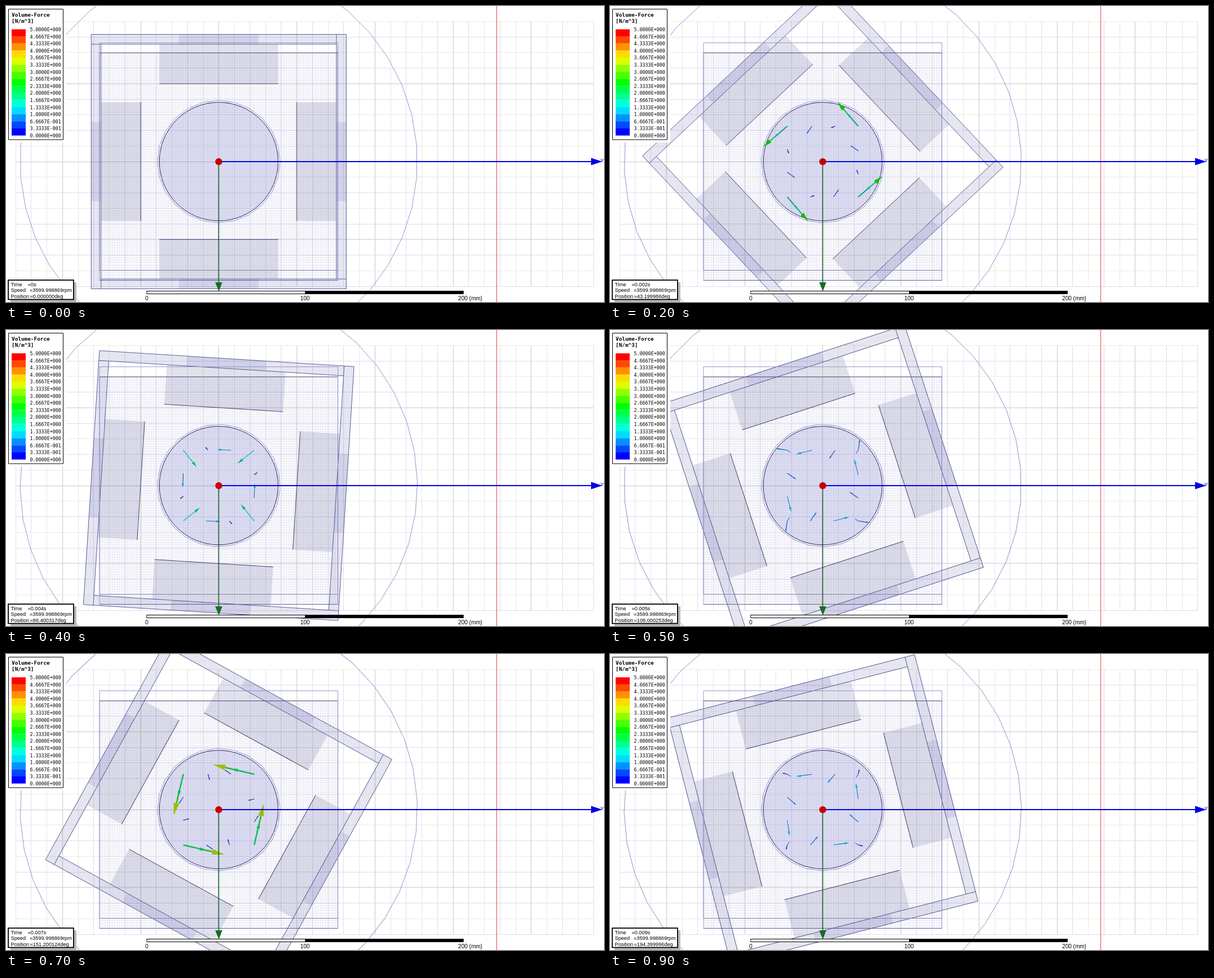
An HTML page that plays this animation: 1062x527 px, repeating every 1000 ms.

```html
<!DOCTYPE html>
<html lang="en">
<head>
<meta charset="utf-8">
<title>Volume force on a rotating field</title>
<style>
  html, body { margin: 0; width: 100%; height: 100%; overflow: hidden; background: #fff; }
  svg { display: block; width: 1062px; height: 527px; }
  text { white-space: pre; fill: #000; }
  .mono { font: 8.35px "DejaVu Sans Mono", monospace; }
  .title { font: bold 9.4px "DejaVu Sans Mono", monospace; }
  .sans { font: 9.2px "Liberation Sans", Arial, sans-serif; }
  .scale { font: 10px "Liberation Sans", Arial, sans-serif; }
  .edge { fill: none; stroke: #50508f; stroke-width: .9; }
  .pale { fill: none; stroke: #8c8cca; stroke-width: .9; }
  .dark { fill: none; stroke: #34346a; stroke-width: .9; }
</style>
</head>
<body>
<svg viewBox="0 0 1062 527">
  <defs>
    <pattern id="dots" width="3" height="3" patternUnits="userSpaceOnUse">
      <rect width="1" height="1" fill="#5a5aaf" fill-opacity=".58"/>
    </pattern>
    <pattern id="hatch" width="2" height="2" patternUnits="userSpaceOnUse">
      <path d="M0 0h1v1h-1zM1 1h1v1h-1z" fill="#28288c" fill-opacity=".23"/>
    </pattern>
  </defs>

  <g id="grid"></g>
  <rect x="166" y="83" width="423" height="406" fill="url(#dots)"/>
  <g id="rotor"></g>
  <path class="pale" d="M166 65.5H589.5V470.5H166z"/>
  <path class="edge" d="M166 83.5H589.5M166 488.5H589.5"/>
  <path class="pale" d="M166 83V489M589.5 83V489"/>
  <circle cx="377.8" cy="277" r="105.5" fill="#5a5abe" fill-opacity=".18" stroke="#202060"/>
  <g id="forces" transform="translate(377.8 277)"></g>

  <path d="M871.5 0V527" stroke="#d84848"/>
  <path d="M378 277H1040" stroke="#0000e6" stroke-width="2"/>
  <path d="M1039 270.5L1059 277L1039 283.5z" fill="#0000e6"/>
  <text class="sans" x="1055.5" y="277.5" style="fill:#0000e6">Y</text>
  <path d="M377.7 277V493" stroke="#1e6432" stroke-width="1.6"/>
  <path d="M371.5 492h12.5L378 508z" fill="#146e1e"/>
  <circle cx="377.8" cy="277.2" r="6.2" fill="#c80000"/>

  <path d="M0 0H107V243H0z" fill="#fff"/>
  <path d="M4.5 5.5H101.5V238H4.5z" fill="#fff" stroke="#000"/>
  <text class="title" x="10" y="19">Volume-Force</text>
  <text class="title" x="10" y="30">[N/m^3]</text>
  <g id="legend"></g>

  <rect x="8" y="492" width="117" height="35" fill="#b9b9b4"/>
  <rect x="4" y="488" width="116" height="34.5" fill="#fff" stroke="#000" stroke-width="1.8"/>
  <g class="sans">
    <text x="8.5" y="498.5">Time</text><text id="time" x="38.5" y="498.5"></text>
    <text x="8.5" y="509">Speed</text><text x="42" y="509">=3599.998869rpm</text>
    <text x="8.5" y="519.5">Position</text><text id="angle" x="42.5" y="519.5"></text>
  </g>

  <rect x="250" y="507.5" width="562" height="5" fill="#fff" stroke="#000"/>
  <rect x="531" y="507" width="281.5" height="6" fill="#000"/>
  <g class="scale" text-anchor="middle">
    <text x="250" y="524">0</text><text x="531" y="524">100</text><text x="824.5" y="524">200 (mm)</text>
  </g>
</svg>
<script>
const CX = 377.8, CY = 277, STEP_MS = 100, STEP_DEG = 21.6;
const get = id => document.getElementById(id);
const rows = (n, draw) => Array.from({ length: n }, (_, i) => draw(i)).join('');

// Grid
const CELL = 27.75;
function gridLine(i, vertical) {
  const at = Math.floor((vertical ? CX : CY) + i * CELL) + .5;
  const major = i % 5 === 0;
  const color = major ? '#d6d6d6' : i % 2 ? (vertical ? '#e6e6e6' : '#ecebdc') : '#dcdcf2';
  const d = vertical ? `M${at} 27V499` : `M17 ${at}H1044`;
  return `<path d="${d}" stroke="${color}" stroke-width="${major ? 1.5 : 1}"/>`;
}
get('grid').innerHTML = rows(38, i => gridLine(i - 13, true)) + rows(18, i => gridLine(i - 9, false));

// Legend
const BAND = 12.6;
function exponent(v) {
  if (v === 0) return '0.0000E+000';
  return v < 1 ? (v * 10).toFixed(4) + 'E-001' : v.toFixed(4) + 'E+000';
}
get('legend').innerHTML =
  rows(15, i => `<rect x="10" y="${41.5 + i * BAND}" width="25" height="${BAND + .1}" fill="hsl(${i * 240 / 14} 100% 50%)"/>`) +
  rows(16, i => `<text class="mono" x="42.5" y="${45 + i * BAND}">${exponent((15 - i) / 3)}</text>`);

// Rotor
function polygon(n, r, phase) {
  const pts = rows(n, i => {
    const a = (i + phase) * 2 * Math.PI / n;
    return `${(r * Math.cos(a)).toFixed(2)},${(r * Math.sin(a)).toFixed(2)} `;
  });
  return `<polygon class="pale" points="${pts}"/>`;
}
const side = `
  <path d="M-226.5 -226.5H209V-209H-226.5z" fill="url(#hatch)"/>
  <rect x="-70.5" y="-226.5" width="141" height="17.5" fill="#4646a0" fill-opacity=".13"/>
  <rect x="-105.5" y="-209" width="211" height="70.5" fill="#464682" fill-opacity=".16"/>
  <path class="edge" d="M-226.5 -226.5H226.5M-226.5 -209H209"/>
  <path class="dark" d="M-105.5 -138.5H105.5"/>`;
get('rotor').innerHTML = rows(4, i => `<g transform="rotate(${i * 90})">${side}</g>`) +
  polygon(40, 352.8, .5) + polygon(24, 109, 0);

// Force vectors, given for one quadrant and repeated four times.
// Each row: corner, left and right vector.
const forces = [
  [],
  [0, -28, -28, 12, -7, 14],
  [-37, -43, -10, 14, -8, 3],
  [-70, -9, 3, 10, -9, -5],
  [-30, 24, -5, -6, -25, -1],
  [3, -20, -28, 7, -11, 16],
  [-27, -44, -13, 15, -8, 5],
  [-73, -17, 3, 11, -12, -8],
  [-34, 21, -8, -5, -29, 2],
  [2, -9, -28, 4, -14, 16]
];
const tails = [[63, -63], [-19, -63], [22, -63]];

// The shaft is cooler than the head, more so on long arrows.
function arrow(x, y, dx, dy, part = 1) {
  const len = Math.hypot(dx, dy) * part;
  const head = Math.max(4, len * .29), half = Math.max(1.2, len * .066);
  const hue = 255 - 2.45 * len;
  const color = h => `hsl(${h} 95% 38%)`;
  const turn = Math.atan2(dy, dx) * 180 / Math.PI;
  return `<g transform="translate(${x} ${y}) rotate(${turn})">
    <path d="M0 0H${len - head}" stroke="${color(hue + .5 * len)}" stroke-width="${Math.max(1.1, len * .034)}"/>
    <path d="M${len} 0L${len - head} ${-half}V${half}z" fill="${color(hue)}"/></g>`;
}
function quadrant(v) {
  let out = '';
  tails.forEach(([x, y], k) => {
    const dx = v[2 * k], dy = v[2 * k + 1];
    out += arrow(x, y, dx, dy);
    if (Math.hypot(dx, dy) > 50) out += arrow(x, y, dx, dy, .57);
  });
  if (v[0] >= 0) out += '<path d="M59 -57L63 -63" stroke="#1446c8"/>';
  return out;
}

const angles = ['0.000000', '21.599993', '43.199986', '64.799808', '86.400317',
  '108.000253', '129.600189', '151.200124', '172.800060', '194.399996'];

function show(n) {
  const turn = n * STEP_DEG;
  get('rotor').setAttribute('transform', `translate(${CX} ${CY}) rotate(${-turn})`);
  // Keep the hatch aligned with the screen.
  get('hatch').setAttribute('patternTransform', `rotate(${turn % 90}) translate(.2 0)`);
  const v = forces[n];
  get('forces').innerHTML = v.length
    ? rows(4, i => `<g transform="rotate(${i * 90})">${quadrant(v)}</g>`) : '';
  get('time').textContent = n ? `=0.00${n}s` : '=0s';
  get('angle').textContent = `=${angles[n]}deg`;
}

let start = null, current = 0;
show(0);
function tick(now) {
  if (start === null) start = now;
  const n = Math.floor(Math.max(0, now - start) / STEP_MS) % forces.length;
  if (n !== current) show(current = n);
  requestAnimationFrame(tick);
}
requestAnimationFrame(tick);
</script>
</body>
</html>
```
